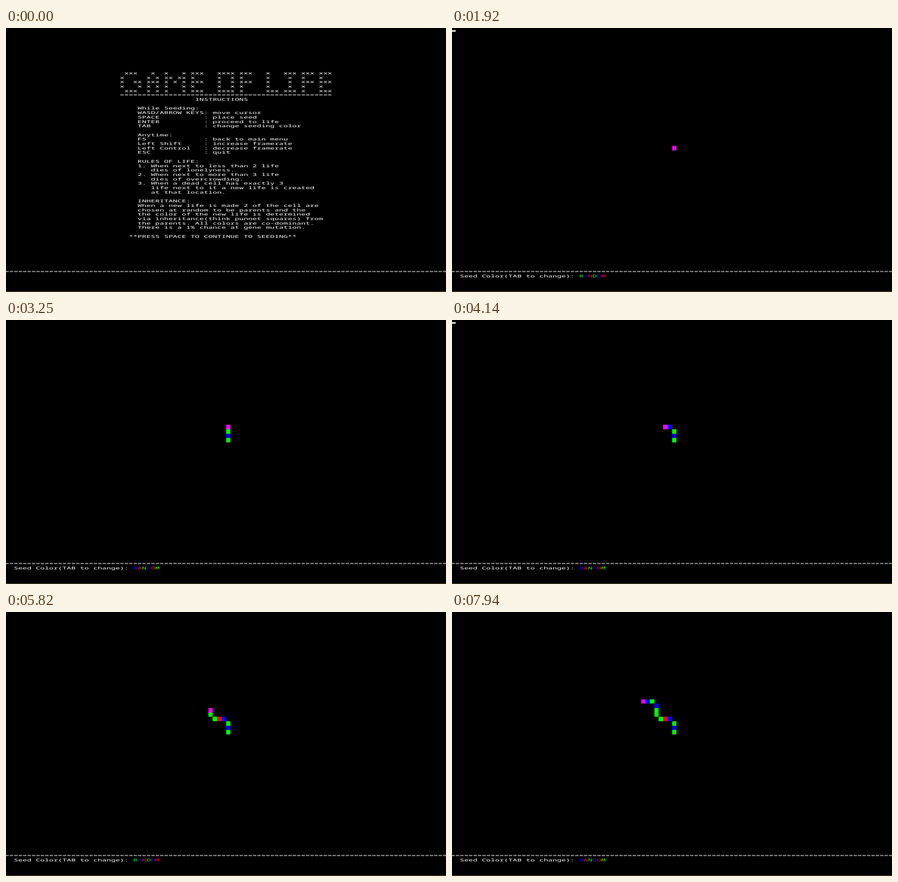
Write an HTML page that moves like this. It is 965 px wide and 580 px high and loops after 8 s.

```html
<!DOCTYPE html>
<html lang="en">
<head>
<meta charset="utf-8">
<title>Game of Life</title>
<style>
  html, body { margin: 0; width: 100%; height: 100%; overflow: hidden; background: #000; }
  svg { display: block; }
  text {
    font-family: "Noto Sans Mono", "DejaVu Sans Mono", monospace;
    font-size: 16.167px; white-space: pre; text-rendering: geometricPrecision;
  }
</style>
</head>
<body>
<svg id="stage" width="965" height="580" viewBox="0 0 965 580">
  <rect width="965" height="580"/>
  <rect y="579" width="965" height="1" fill="#66521a"/>
</svg>
<script>
const LOOP = 8000, START = 690;
const CELL = 9.7, EDGE = -2.45; // the console grid is cropped a little at the top left
const BASELINE = 7.3;
const SQUASH = 0.53; // the console font is much wider than tall
const RED = "#f00", GREEN = "#0f0", BLUE = "#00f", PINK = "#f0f";
const INK = [RED, GREEN, BLUE];

const title = [
  " xxx   x  x   x xxx   xxxx xxx   x   xxx xxx xxx",
  "x     x x xx xx x     x  x x     x    x  x   x",
  "x  xx xxx x x x xxx   x  x xxx   x    x  xxx xxx",
  "x   x x x x   x x     x  x x     x    x  x   x",
  " xxx  x x x   x xxx   xxxx x     xxx xxx x   xxx",
  "=".repeat(48)
];

const help = [
  "While Seeding:",
  "WASD/ARROW KEYS: move cursor",
  "SPACE          : place seed",
  "ENTER          : proceed to life",
  "TAB            : change seeding color",
  "",
  "Anytime:",
  "F5             : back to main menu",
  "Left Shift     : increase framerate",
  "Left Control   : decrease framerate",
  "ESC            : quit",
  "",
  "RULES OF LIFE:",
  "1. When next to less than 2 life",
  "   dies of lonelyness.",
  "2. When next to more than 3 life",
  "   dies of overcrowding.",
  "3. When a dead cell has exactly 3",
  "   life next to it a new life is created",
  "   at that location.",
  "",
  "INHERITANCE:",
  "When a new life is made 2 of the cell are",
  "chosen at random to be parents and the",
  "the color of the new life is determined",
  "via inheritance(think punnet squares) from",
  "the parents. All colors are co-dominant.",
  "There is a 1% chance at gene mutation."
];

// time, step in columns, step in rows, seed left behind
const moves = [
  [2130, 0, -1, GREEN], [2620, 0, -1, BLUE], [3250, 0, -1, GREEN],
  [3560, -1, 0, null], [4060, -1, 0, BLUE], [4600, -1, 0, RED],
  [4930, -1, 0, GREEN], [5330, 0, -1, null], [5820, 0, -1, GREEN],
  [6200, 0, -1, GREEN], [6690, 0, -1, BLUE], [7110, -1, 0, null],
  [7530, -1, 0, GREEN], [7940, -1, 0, BLUE]
];
const ticks = [990, 1310, 1590, 1920, 2230, 2520, 2820, 3150, 3530, 3840, 4140, 4470,
  4770, 5090, 5360, 5690, 6000, 6300, 6620, 6920, 7220, 7530, 7840];
const blinks = [740, 2820, 3980, 4470, 5010, 5530, 6020, 6560];

const stage = document.getElementById("stage");
const pos = n => EDGE + n * CELL;
const snap = n => Math.round(pos(n));

function add(parent, name, attrs) {
  const el = document.createElementNS("http://www.w3.org/2000/svg", name);
  for (const key in attrs) el.setAttribute(key, attrs[key]);
  return parent.appendChild(el);
}

function write(parent, col, row, str, fill = "#fff") {
  const el = add(parent, "text", {
    transform: `translate(${pos(col)} ${pos(row) + BASELINE}) scale(1 ${SQUASH})`, fill
  });
  el.textContent = str;
  return el;
}

function place(el, col, row) {
  el.setAttribute("x", snap(col));
  el.setAttribute("y", snap(row));
  el.setAttribute("width", snap(col + 1) - snap(col));
  el.setAttribute("height", snap(row + 1) - snap(row));
}

function cell(parent, col, row, fill) {
  const el = add(parent, "rect", { fill });
  place(el, col, row);
  return el;
}

function show(el, on) {
  el.setAttribute("visibility", on ? "visible" : "hidden");
}

const count = (times, t) => times.filter(at => at <= t).length;

write(stage, 0, 55, "=".repeat(100));

const menu = add(stage, "g", {});
title.forEach((line, i) => write(menu, 26, 10 + i, line));
write(menu, 43, 16, "INSTRUCTIONS");
help.forEach((line, i) => write(menu, 30, 18 + i, line));
write(menu, 28, 47, "**PRESS SPACE TO CONTINUE TO SEEDING**");

const board = add(stage, "g", {});
write(board, 2, 56, "Seed Color(TAB to change):");
const letters = [..."RANDOM"].map((ch, i) => write(board, 29 + i, 56, ch));

const path = [[50, 27]];
const seeds = moves.map(([at, dx, dy, color], i) => {
  const [col, row] = path[i];
  path.push([col + dx, row + dy]);
  return { at, el: color && cell(board, col, row, color) };
});
const cursor = cell(board, 50, 27, PINK);
const caret = add(stage, "rect", { y: 5, width: 8, height: 3, fill: "#fff" });

function draw(t) {
  const seeding = t >= START;
  menu.style.display = seeding ? "none" : "";
  board.style.display = seeding ? "" : "none";

  const shift = count(ticks, t);
  letters.forEach((el, i) => el.setAttribute("fill", INK[(i + shift) % 3]));
  for (const { at, el } of seeds) if (el) show(el, t >= at);
  place(cursor, ...path[count(seeds.map(s => s.at), t)]);
  show(caret, count(blinks, t) % 2 === 1);
}

const begin = performance.now();
function frame() {
  draw((performance.now() - begin) % LOOP);
  requestAnimationFrame(frame);
}
draw(0);
requestAnimationFrame(frame);
</script>
</body>
</html>
```
